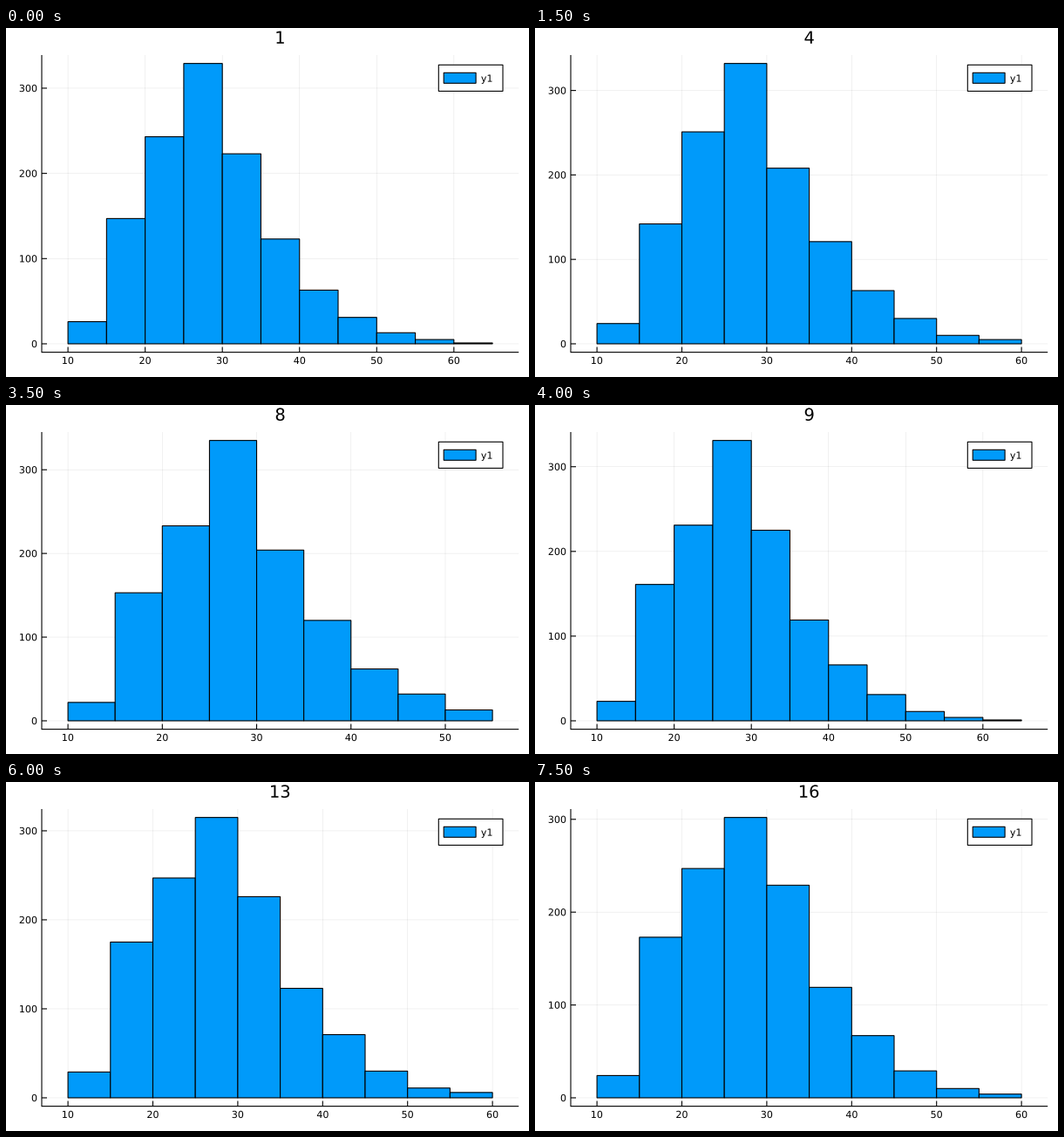
A matplotlib script that plays this animation: 600x400 px, repeating every 8 s.

```python
import numpy as np
import matplotlib.pyplot as plt
from matplotlib.animation import FuncAnimation
from matplotlib.patches import PathPatch, Rectangle
from matplotlib.path import Path
from matplotlib.textpath import TextPath

W, H, DPI = 600, 400, 100
PX = 72 / DPI
BLUE = "#009afa"
FONT = dict(family="DejaVu Sans")
SMALL, LARGE = 11.1, 19.45

# Plot area; the data is inset by a 3% margin, applied twice along x
LEFT, RIGHT, TOP, BOTTOM = 41, 588.2, 31, 371.6
MID = (LEFT + RIGHT) / 2
HALF = (RIGHT - LEFT) / 2 / 1.06 ** 2
X0, X1 = MID - HALF, MID + HALF
PAD = (BOTTOM - TOP) * 0.03 / 1.06
Y0, Y1 = BOTTOM - PAD, TOP + PAD

# Typical counts in bins of width 5, starting at 10
SHAPE = np.array([25, 159, 241, 325, 218, 121, 65, 30, 12, 5, 1])
LONG, SHORT = {1, 3, 7, 9, 12, 14}, {8, 10, 15}


def counts(n):
    """Bin heights of sample n: the typical shape, a slow drift and noise."""
    size = 11 if n in LONG else 9 if n in SHORT else 10
    noise = np.random.default_rng(n).normal(0, 0.4, len(SHAPE))
    h = SHAPE + noise * np.sqrt(SHAPE)
    h[1] = np.interp(n, [1, 6, 11, 16], [147, 138, 176, 173])
    h[3] = np.interp(n, [1, 8, 11, 16], [329, 335, 324, 302])
    return np.maximum(1, np.round(h[:size])).astype(int)


fig = plt.figure(figsize=(W / DPI, H / DPI), dpi=DPI, facecolor="white")
ax = fig.add_axes([0, 0, 1, 1])


def label(s, x, y, size=SMALL, anchor=0.5):
    """Text with its baseline at y; anchor 0, 0.5, 1 = left, centre, right."""
    path = TextPath((0, 0), s, size=size, prop=FONT)
    box = path.get_extents()
    shift = x - box.x0 - anchor * box.width
    verts = path.vertices * [1, -1] + [shift, y]
    ax.add_patch(PathPatch(Path(verts, path.codes), fc="black", lw=0, zorder=6))


def line(xs, ys, **style):
    opts = dict(color="black", lw=1.1 * PX, zorder=3, snap=False,
                solid_capstyle="butt") | style
    ax.plot(xs, ys, **opts)


def box(x0, y0, x1, y1, fill=BLUE, z=2):
    ax.add_patch(Rectangle((x0, y0), x1 - x0, y1 - y0, fc=fill, ec="black",
                           lw=1.1 * PX, zorder=z, snap=False,
                           joinstyle="miter"))


def draw(i):
    ax.clear()
    ax.set(xlim=(0, W), ylim=(H, 0))
    ax.axis("off")

    heights = counts(i + 1)
    span, peak = 5 * len(heights), max(heights)

    def px(v):
        return X0 + (v - 10) / span * (X1 - X0)

    def py(v):
        return Y0 + v / peak * (Y1 - Y0)

    grid = dict(alpha=0.1, lw=0.55 * PX, zorder=1)
    for v in range(10, 11 + span, 10):
        x = px(v)
        line([x, x], [TOP, BOTTOM], **grid)
        line([x, x], [BOTTOM, BOTTOM - 6])
        label(str(v), x, 385)
    for v in range(0, peak + 1, 100):
        y = py(v)
        line([LEFT, RIGHT], [y, y], **grid)
        line([LEFT, LEFT + 6], [y, y])
        label(str(v), 35.3, y + 4.1, anchor=1)

    for k, h in enumerate(heights):
        box(px(10 + 5 * k), py(h), px(15 + 5 * k), Y0)

    line([LEFT, LEFT], [TOP, BOTTOM + 0.5])
    line([LEFT, RIGHT], [BOTTOM, BOTTOM])

    box(496.3, 42.3, 570, 72.4, "white", 4)
    box(502.2, 51.3, 539.1, 63.3, z=5)
    label("y1", 545.2, 61.6, anchor=0)
    label(str(i + 1), MID, 17.8, LARGE)


anim = FuncAnimation(fig, draw, frames=16, interval=500, repeat=True,
                     repeat_delay=0)
plt.show()
```
